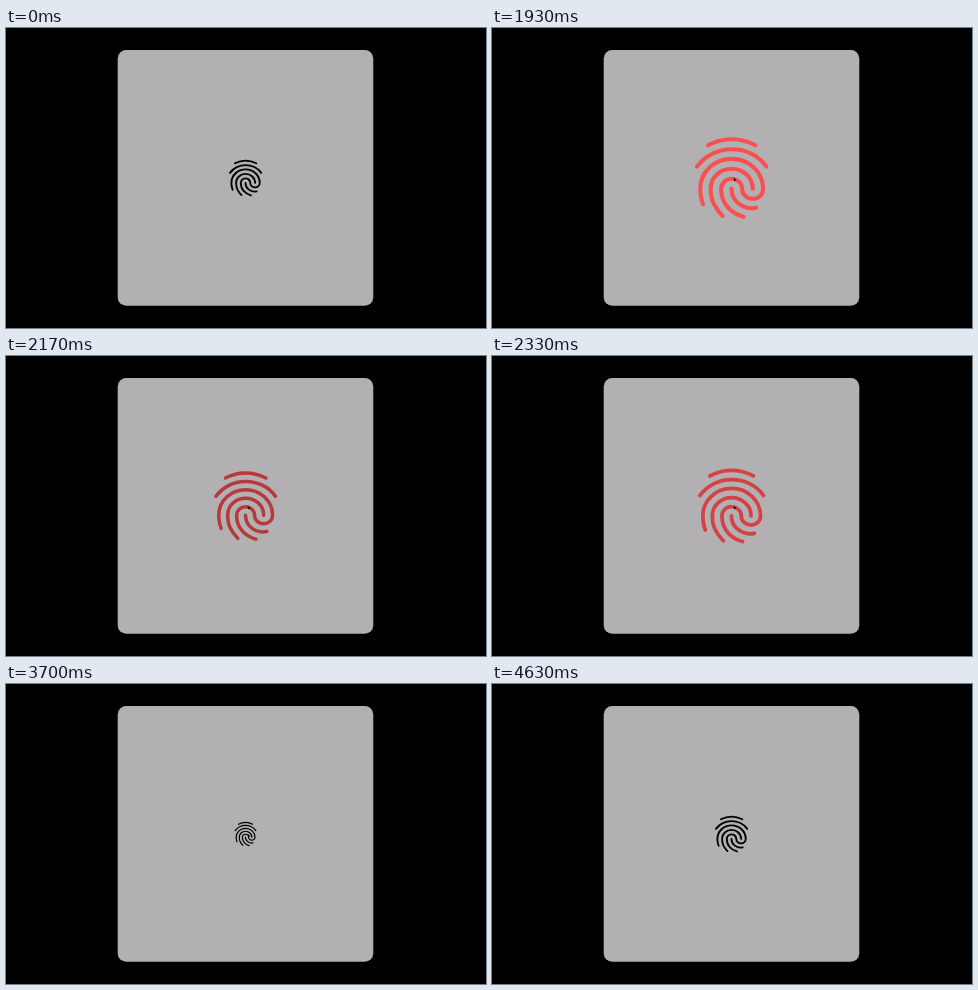
An HTML page that plays this animation: 480x300 px, repeating every 5010 ms.

```html
<!DOCTYPE html>
<html lang="en">
<head>
<meta charset="utf-8">
<title>Fingerprint press</title>
<style>
  html, body { margin: 0; width: 100%; height: 100%; overflow: hidden; background: #000; }
  svg { display: block; width: 100vw; height: 100vh; }
  #print { fill: none; stroke-width: 40; stroke-linecap: round; }
</style>
</head>
<body>
<svg viewBox="0 0 480 300">
  <rect x="111.7" y="22" width="255.6" height="255.7" rx="8.5" fill="#b2b0b2"/>
  <g id="print">
    <path d="M250-800Q360-859 481-859T714-801"/>
    <path d="M142-591Q201-672 290-716.5T481-761T672.5-719T822-592"/>
    <path d="M201-224Q187-262 180.5-300T174-374Q174-498 264-582.5T481-667T698.5-583T790-374
             Q790-332 760.5-304.5T688-277T614.5-304.5T584-374T554-443.5T481-472T408-443.5T378-374
             Q378-270 440-198T599-101"/>
    <path d="M392-109Q335-170 305.5-229T276-374Q276-457 336.5-513.5T481-570T627-513.5T688-374"/>
    <path d="M480-374Q480-291 540-237.5T680-183Q698-183 724-188"/>
  </g>
  <path d="M241.4 149.4L244.6 152.2L243.2 152.4L242.6 153.6Z"/>
</svg>
<script>
  const LOOP = 5010, PRESS = 1800, RELEASE = 3525;
  const UNIT = 0.046;
  const DECAY = 6.3, FREQ = 18.3;
  const RED = [204, 65, 65];
  const print = document.getElementById('print');

  // Underdamped spring from 0 to 1, time in ms.
  function spring(ms) {
    if (ms <= 0) return 0;
    const t = ms / 1000, x = FREQ * t;
    return 1 - Math.exp(-DECAY * t) * (Math.cos(x) + DECAY / FREQ * Math.sin(x));
  }

  function draw(now) {
    const t = now % LOOP;
    const p = t < RELEASE ? spring(t - PRESS) : 1 - spring(t - RELEASE);
    const color = RED.map(c => Math.round(Math.min(255, Math.max(0, c * p))));
    print.setAttribute('transform', `translate(239.5 150) scale(${UNIT * (1 + p)}) translate(-480 480)`);
    print.setAttribute('stroke', `rgb(${color})`);
  }

  const start = performance.now();
  function tick() {
    draw(performance.now() - start);
    requestAnimationFrame(tick);
  }
  tick();
</script>
</body>
</html>
```
